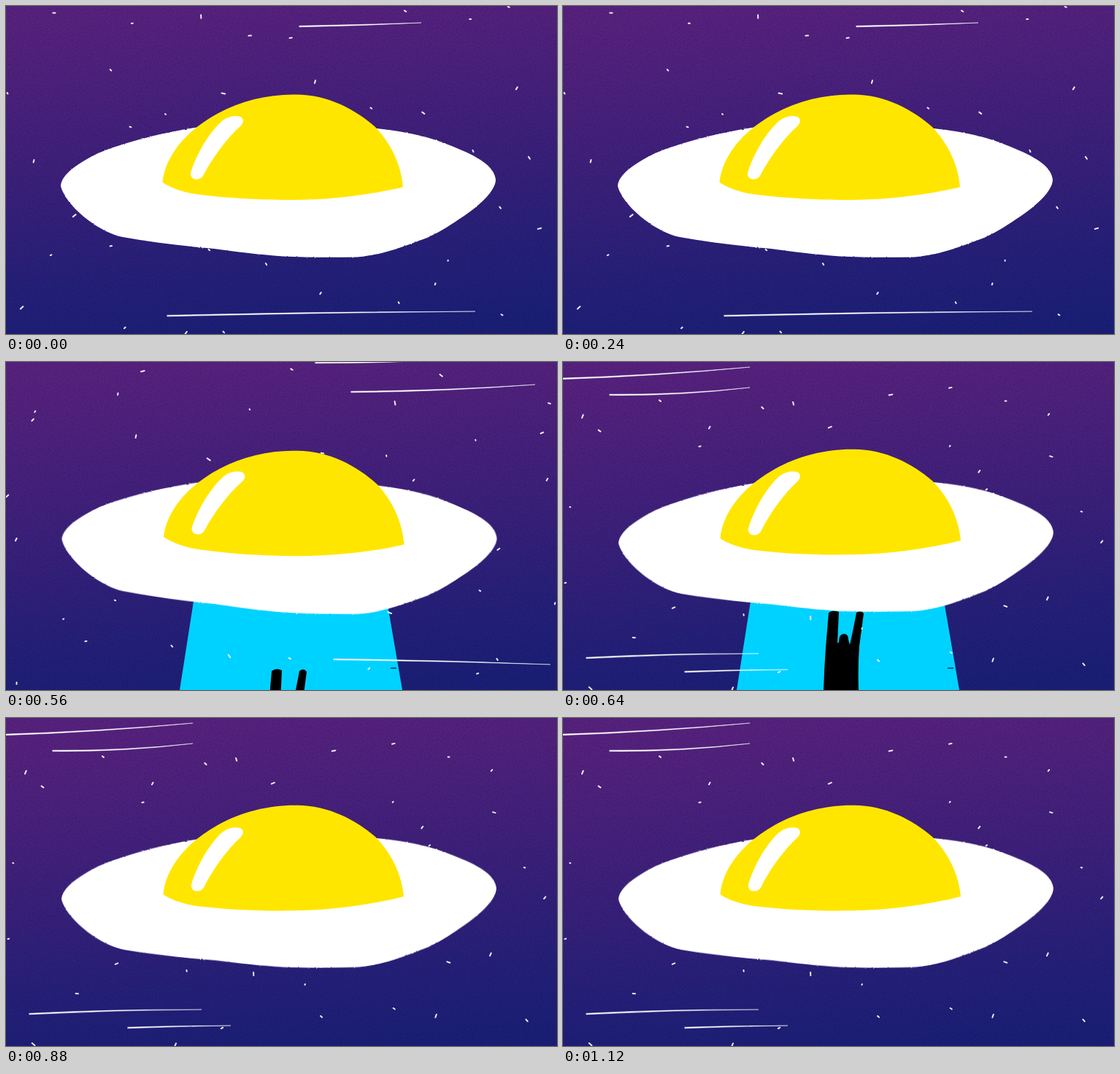
An HTML page that plays this animation: 755x450 px, repeating every 1200 ms.

```html
<!DOCTYPE html>
<html lang="en">
<head>
<meta charset="utf-8">
<title>Fried egg saucer</title>
<style>
  html, body { margin: 0; width: 100%; height: 100%; overflow: hidden; background: #36207a; }
  svg { display: block; width: 755px; height: 450px; }
</style>
</head>
<body>
<svg viewBox="0 0 755 450" xmlns="http://www.w3.org/2000/svg">
  <defs>
    <linearGradient id="night" gradientUnits="userSpaceOnUse" x1="360" y1="0" x2="395" y2="450">
      <stop offset="0" stop-color="#58227f"/>
      <stop offset=".25" stop-color="#4a217d"/>
      <stop offset=".55" stop-color="#37207b"/>
      <stop offset=".8" stop-color="#25207a"/>
      <stop offset="1" stop-color="#1b1f77"/>
    </linearGradient>
    <filter id="rough" x="-5%" y="-5%" width="110%" height="110%" color-interpolation-filters="sRGB">
      <feTurbulence type="fractalNoise" baseFrequency=".35" numOctaves="2" seed="4"/>
      <feDisplacementMap in="SourceGraphic" scale="2" xChannelSelector="R" yChannelSelector="G"/>
    </filter>
    <filter id="grain" x="0" y="0" width="100%" height="100%" color-interpolation-filters="sRGB">
      <feTurbulence type="fractalNoise" baseFrequency=".6" numOctaves="2" seed="9"/>
      <feColorMatrix values="0 0 0 0 0  0 0 0 0 0  0 0 0 0 .1  .5 0 0 0 -.21"/>
    </filter>
  </defs>

  <rect width="755" height="450" fill="url(#night)"/>
  <rect width="755" height="450" filter="url(#grain)"/>

  <g id="beam">
    <path fill="#00d2ff" d="M258 322L238 450H543L521 322Z"/>
    <path stroke="#12306e" stroke-width="1.5" d="M527 420h8"/>
  </g>

  <!-- arms raised, head between them, legs trailing -->
  <path id="person" d="M364 344Q370 339 378 343Q377 365 376 386L378 384Q378 373 385 373Q391 373 391 381L393 388
    Q398 366 402 344Q408 339 412 345Q409 368 406 390Q404 420 405 450L404 480L402 503L396 538Q391 543 387 538L386 503
    H376L361 541Q355 547 351 541L355 503L357 450Q358 420 360 392Z"/>

  <g fill="#fff" stroke="#fff" stroke-linecap="round">
    <path id="lines" stroke-width=".5"/>
    <path id="specks" fill="none" stroke-width="2" opacity=".9"/>
  </g>

  <g id="egg">
    <path filter="url(#rough)" fill="#fff" d="M75 247C76 231 98 216 126 202C160 188 205 176 252 168L380 150L508 168
      C550 172 585 181 613 193C645 206 669 219 671 238C671 254 648 275 620 293C604 304 592 311 577 318
      C545 330 515 342 481 344.5C445 345 410 345 380 343.5C345 341 315 337 285 333C240 329 200 324 160 317
      C128 311 82 275 75 247Z"/>
    <path fill="#ffe600" d="M214.5 242C218 207 245 172 290 147.5C322 130 360 121 396 121.5C440 121 479 142 506 166
      C529 190 542 220 544 248.5C500 259 440 266.5 390 266C340 266 300 263 272 259.5C250 258 228 251 214.5 242Z"/>
    <path fill="#fff" d="M253 229C260 206 277 174 297 157C305 151 315 150 321 152C327 155 325 161 321 165
      C302 182 283 208 270 233C266 240 252 240 253 229Z"/>
  </g>
</svg>

<script>
const STEP = 80, COUNT = 15, BEAM_ON = 4, BEAM_OFF = 10, RISE = 80;
const el = id => document.getElementById(id);

// Three drawings take turns; a line is x1, y1, x2, y2, bend
const drawings = [
  { tilt: 0, dx: 0, dy: 0, seed: 11,
    lines: [[402, 28, 569, 23, 1], [221, 425, 643, 419, -2]] },
  { tilt: .7, dx: 1.5, dy: 0, seed: 23,
    lines: [[424, 1, 563, -1, 1], [473, 41, 725, 31, 4], [449, 408, 746, 415, -2]] },
  { tilt: -.65, dx: 1, dy: -1.5, seed: 37,
    lines: [[-4, 23, 256, 7, 4], [64, 45, 256, 35, 6], [32, 406, 268, 400, -3], [167, 425, 308, 422, -1]] }
];

// Thick at the start, thin at the end
function streak([x1, y1, x2, y2, bend]) {
  const mx = (x1 + x2) / 2, my = (y1 + y2) / 2 + bend;
  return `M${x1} ${y1 - .8}Q${mx} ${my - .8} ${x2} ${y2}Q${mx} ${my + .8} ${x1} ${y1 + .8}Z`;
}

function randomFrom(seed) {
  return () => (seed = seed * 16807 % 2147483647) / 2147483647;
}

// Short dashes, one at a random place in each cell of a loose grid
function scatter(seed, cols = 8, rows = 6) {
  const rand = randomFrom(seed * 7919);
  let d = '';
  for (let i = 0; i < cols * rows; i++) {
    const x = (i % cols + rand()) * 755 / cols;
    const y = (Math.floor(i / cols) + rand()) * 450 / rows;
    const angle = rand() * Math.PI, size = 1 + rand() * 4;
    d += `M${x.toFixed(1)} ${y.toFixed(1)}l${(size * Math.cos(angle)).toFixed(1)} ${(size * Math.sin(angle)).toFixed(1)}`;
  }
  return d;
}

for (const item of drawings) {
  item.linePath = item.lines.map(streak).join('');
  item.speckPath = scatter(item.seed);
}

const show = (id, on) => el(id).setAttribute('visibility', on ? 'visible' : 'hidden');

function draw(n) {
  const { tilt, dx, dy, linePath, speckPath } = drawings[n % 3];
  el('egg').setAttribute('transform', `translate(${dx} ${dy}) rotate(${tilt} 373 243)`);
  el('lines').setAttribute('d', linePath);
  el('specks').setAttribute('d', speckPath);
  const beamOn = n >= BEAM_ON && n <= BEAM_OFF;
  show('beam', beamOn);
  show('person', beamOn);
  el('person').setAttribute('transform', `translate(0 ${(8 - n) * RISE})`);
}

let last = -1;
const start = performance.now();
function tick() {
  const n = Math.floor((performance.now() - start) / STEP) % COUNT;
  if (n !== last) draw(last = n);
  requestAnimationFrame(tick);
}
tick();
</script>
</body>
</html>
```
